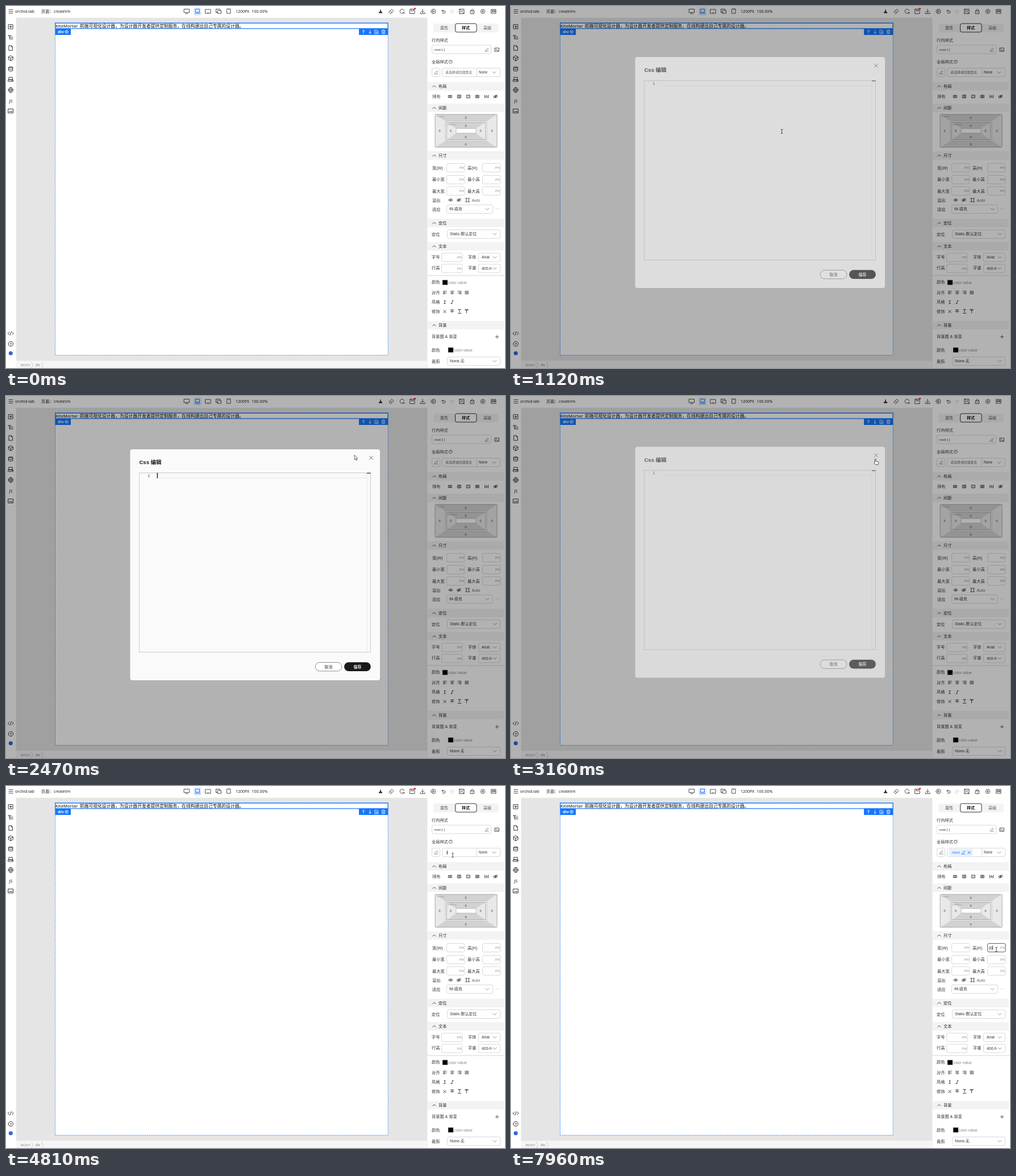
An HTML page that plays this animation: 878x638 px, repeating every 8000 ms.

```html
<!DOCTYPE html>
<html lang="zh-CN">
<head>
<meta charset="utf-8">
<title>Style panel</title>
<style>
html, body { margin: 0; width: 100%; height: 100%; overflow: hidden; background: #fff; }
svg { display: block; }
text { font-family: "Liberation Sans", "Noto Sans CJK SC", "Noto Sans CJK", sans-serif; white-space: pre; }
.ui { font-family: "Noto Sans", "Noto Sans CJK SC", "Noto Sans CJK", sans-serif; }
.mono { font-family: "Liberation Mono", monospace; }
</style>
</head>
<body>
<svg id="stage" width="878" height="638" viewBox="0 0 878 638"></svg>
<script>
const BLUE = '#1476ff', INK = '#222', EDGE = '#d0d0d0', MUTED = '#888';

const text = (x, y, s, size = 7.2, fill = '#333', more = '') =>
  `<text x="${x}" y="${y}" font-size="${size}" fill="${fill}" ${more}>${s}</text>`;
const rect = (x, y, w, h, fill = 'none', stroke = 'none', r = 0, more = '') =>
  `<rect x="${x}" y="${y}" width="${w}" height="${h}" rx="${r}" fill="${fill}" stroke="${stroke}" ${more}/>`;
const path = (d, stroke = INK, w = 0.8, fill = 'none', more = '') =>
  `<path d="${d}" stroke="${stroke}" stroke-width="${w}" fill="${fill}" ${more}/>`;
const icon = (x, y, d, stroke, w, fill) =>
  path(d, stroke, w, fill, `transform="translate(${x} ${y})" stroke-linecap="round" stroke-linejoin="round"`);
const group = (id, body, more = '') => `<g id="${id}" ${more}>${body}</g>`;
const ring = r => `M${-r} 0a${r} ${r} 0 1 0 ${2 * r} 0a${r} ${r} 0 1 0 ${-2 * r} 0`;
const box = (w, h) => `M${-w / 2} ${-h / 2}h${w}v${h}h${-w}z`;
const chevron = (x, y) => icon(x, y, 'M-3-1.5L0 1.5L3-1.5', '#666', 0.7);
const field = (x, y, w, edge = EDGE, fill = '#fff') =>
  rect(x + .5, y + .5, w - 1, 15, fill, edge, 2.5, 'stroke-width=".8"');
const PENCIL = 'M-2.8 2.8l.6-2.2L1.4-3L3-1.4L-.6 2.2zM0 3h3';
const CROSS = 'M-3-3L3 3M3-3L-3 3';
const EYE = 'M-3.5 0Q0-4.4 3.5 0Q0 4.4-3.5 0zM-1 0a1 1 0 1 0 2 0a1 1 0 1 0-2 0';

function topBar() {
  const items = [
    [318, 9, 'M-4.5-3.5h9v6h-9zM-2 4.5h4'],
    [355.5, 9.5, box(9, 7) + 'M-.5 2h1'],
    [374, 9, 'M-4.5-3.5h7v2M-4.5-3.5v6h3M-1.5-1h6v5h-6z'],
    [392, 9, box(6, 8) + 'M-.5-2.3h1'],
    [678, 9.5, 'M-4 1L1-4L4-1L-1 4zM-2-1L1 2'],
    [697, 9.5, 'M3 2.2A3.8 3.8 0 1 1 3.7-1M1.7 2h2.2v2'],
    [715, 9.5, 'M-4-4h7l1 1v7h-8zM-2-4v3h4v-3'],
    [733, 9.5, 'M0-4v6M-2.5-.5L0 2L2.5-.5M-4 2v2h8v-2'],
    [752, 9.5, ring(4) + 'M-1-1.8L2 0L-1 1.8z'],
    [770, 9.5, 'M-1-3L-3-1L-1 1M-3-1h4q2 0 2 2t-2 2h-3'],
    [802, 9.5, box(8, 8) + 'M-4-4L4 4M1-2h1v1M-2 2v-2'],
    [820.5, 9.5, 'M-3-1h6v5h-6zM-2-1v-1.5q2-3 4 0v1.5M0 1v1'],
    [839, 9.5, 'M-3.8 0L-2-3.4H2L3.8 0L2 3.4H-2z' + ring(1.3)],
    [858, 9.5, box(8, 7)]
  ];
  return rect(0, 0, 878, 20.5, '#fff') +
    icon(8.5, 9.5, 'M-3.5-3h7M-3.5 0h7M-3.5 3h7') +
    text(16, 12, 'orchid-lab', 7.2, INK, 'class="ui"') +
    text(62, 12, '页面：', 7.2, INK) + text(84, 12, 'createVm', 6.6, INK, 'class="ui"') +
    rect(330, 2, 14, 15, '#e5efff', 'none', 2) +
    icon(337, 9, 'M-3.5-3.5h7v5.5h-7zM-4.7 4h9.4', BLUE, 1) +
    items.map(i => icon(...i)).join('') +
    icon(659, 9.5, 'M0-3.3v2M-2.8 2.5Q0-2 2.8 2.5z' + ring(.6), INK, 1.1, INK) +
    icon(784.5, 9.5, 'M1-3L3-1L1 1M3-1h-4q-2 0-2 2t2 2h3', '#ccc') +
    '<circle cx="719.5" cy="4.5" r="1.6" fill="#e8202a"/>' +
    text(858, 11.4, 'EN', 4.8, INK, 'text-anchor="middle" font-weight="bold"') +
    text(404, 12, '1200PX', 7, INK, 'class="ui"') + text(432.5, 12, '100.00%', 7, INK, 'class="ui"');
}

function sideBar() {
  const items = [
    [36.5, box(7.5, 7.5) + 'M0-2v4M-2 0h4'],
    [55, 'M-4-3h5M-2 0h6M-2 3h6M-4-3v1M-2-2v5'],
    [74, 'M-3-4.2h4L3.3-2v6.2h-6.3zM1-4v2h2'],
    [92, 'M0-4.3L4-2V2.3L0 4.5L-4 2.3V-2zM-4-2L0 .2L4-2M0 .2V4.5'],
    [111, 'M-3.5-3q3.5-2 7 0v6q-3.5 2-7 0zM-3.5-3q3.5 2 7 0M-3.5 0q3.5 2 7 0'],
    [129.5, 'M-3-3.8h6v4.3h-6zM-4.2.5h8.4v3h-8.4zM2 2h.5'],
    [148, ring(4.2) + 'M-4 0h8M0-4.2Q-4 0 0 4.2M0-4.2Q4 0 0 4.2'],
    [185, box(8.5, 7)],
    [577, 'M-2.5-2.5L-5 0L-2.5 2.5M2.5-2.5L5 0L2.5 2.5M1-3L-1 3'],
    [595.5, ring(4.2)]
  ];
  return rect(0, 20.5, 17.5, 618, '#fff') +
    items.map(([y, d]) => icon(8.3, y, d, INK, .9)).join('') +
    text(8.5, 169.8, 'JS', 7.4, INK, 'class="ui" text-anchor="middle"') +
    text(8.3, 186.6, 'var', 4.3, INK, 'text-anchor="middle" font-weight="bold"') +
    text(8.3, 597.8, '?', 6.2, INK, 'text-anchor="middle" font-weight="bold"') +
    '<circle cx="8.3" cy="612" r="3.6" fill="#3567d6"/>';
}

function canvasArea() {
  const white = [
    [629, 45.5, 'M0 3V-3M-2-1L0-3L2-1'],
    [640.5, 45.5, 'M0-3V3M-2 1L0 3L2 1'],
    [652, 45.5, 'M-2.7-3h4l1.5 1.5v4.8h-5.5zM-1 0h2M-1 1.5h2'],
    [664, 45.5, 'M-3-2.2h6M-1-3.4h2M-2.3-2v5.2h4.6V-2M-.7 0v1.6M.7 0v1.6'],
    [106.7, 45.5, ring(2.8) + ring(1)]
  ];
  return rect(17.5, 20.5, 723.5, 605, '#e5e5e5') +
    rect(86.5, 29.5, 585.7, 586, '#fff', BLUE, 0, 'stroke-width=".8" stroke-dasharray="1.8 1.5"') +
    rect(86.7, 30.2, 585.3, 9.6, 'none', BLUE, 0, 'stroke-width="1.2"') +
    text(87, 38.2, 'KiteMortar', 7.8, '#111', 'class="ui"') +
    text(129.8, 38.2, '前端可视化设计器，为设计器开发者提供定制服务，在线构建出自己专属的设计器。', 7.8, '#111') +
    rect(86.5, 40, 27.5, 11, BLUE) + rect(621, 40, 51.3, 11, BLUE) +
    text(91, 48, 'div', 7.2, '#fff', 'class="ui" font-weight="600"') +
    white.map(i => icon(...i, '#fff')).join('') +
    rect(17.5, 625.5, 723.5, 13, '#f6f6f6') +
    text(26, 634.8, 'BODY', 6, MUTED) + text(52, 634.8, 'div', 6.4, MUTED) +
    icon(46, 632.5, 'M-1-5L1.5 0L-1 5', '#bbb', .7) + icon(64, 632.5, 'M-1-5L1.5 0L-1 5', '#bbb', .7);
}

function spacing() {
  const quad = (x, y, X, Y, a, b, A, B) =>
    path(`M${x} ${y}H${X}L${A} ${b}H${a}zM${x} ${Y}H${X}L${A} ${B}H${a}z`, 'none', 0, '#d2d2d2') +
    path(`M${x} ${y}L${a} ${b}V${B}L${x} ${Y}zM${X} ${y}L${A} ${b}V${B}L${X} ${Y}z`, 'none', 0, '#e9e9e9');
  const zeros = [[809, 197], [763, 220], [855, 220], [809, 244], [809, 210.5], [782.5, 220], [835, 220], [809, 230.5]];
  return quad(755, 191, 864, 249, 774, 204, 845, 237) +
    rect(755, 191, 109, 58, 'none', '#999', 1, 'stroke-width=".8"') +
    rect(773, 203, 73, 35, '#fff', '#aaa', 0, 'stroke-width=".6"') +
    quad(775, 205, 844, 236, 792, 216, 827, 224) +
    rect(775, 205, 69, 31, 'none', '#888', 0, 'stroke-width=".7"') +
    rect(792, 216, 35, 8, '#fff', '#aaa', 0, 'stroke-width=".7"') +
    text(758, 195.8, 'margin', 4.4, '#999') + text(777, 209.6, 'padding', 4.4, '#999') +
    zeros.map(([x, y]) => text(x, y + 2, '0', 5.4, '#333', 'text-anchor="middle"')).join('');
}

function panel() {
  const heads = [[141.5, '布局'], [179.5, '间距'], [263.5, '尺寸'], [382.5, '定位'], [423.5, '文本'], [562.5, '背景']];
  const labels = [
    [749, 63, '行内样式'], [749, 100.7, '全局样式'], [750, 162, '排布'],
    [750, 287.8, '宽(W)'], [812, 287.8, '高(H)'], [750, 308.4, '最小宽'], [812, 308.4, '最小高'],
    [750, 328.6, '最大宽'], [812, 328.6, '最大高'], [750, 345, '溢出'], [750, 361, '适应'],
    [749, 404.8, '定位'], [749, 444.5, '字号'], [813, 444.5, '字体'], [749, 464, '行高'], [813, 464, '字重'],
    [749, 488.5, '颜色'], [749, 507.8, '对齐'], [749, 524.3, '风格'], [749, 541, '修饰'],
    [749, 585.3, '背景图 &amp; 渐变'], [749, 609, '颜色'], [749, 629, '裁剪']
  ];
  const px = [[775, 277], [838, 277], [775, 298], [838, 298], [775, 318], [838, 318]];
  const selects = [
    [775, 350, 82, 'fill-填充', 780], [776, 394, 94, 'Static-默认定位', 781],
    [831, 435, 39, 'Arial', 837], [831, 454.5, 39, '400-N', 837], [776, 618, 94, 'None-无', 781]
  ];
  const layout = [box(5.5, 4) + 'M-1-.5h2v1h-2z', box(5.5, 5) + 'M-1-2v4M1-2v4', box(5.5, 5) + 'M-1-1h0M1-1h0M-1 1h0M1 1h0',
    box(5.5, 4.6) + 'M-1-1h2v2h-2z', 'M-3-2.5v5M3-2.5v5M-1.3 2L0-2L1.3 2', EYE + 'M-3 3L3-3'];
  const bars = ['M-3-2.4h6M-3-.8h3M-3 .8h6M-3 2.4h3', 'M-3-2.4h6M-1.5-.8h3M-3 .8h6M-1.5 2.4h3',
    'M-3-2.4h6M0-.8h3M-3 .8h6M0 2.4h3', 'M-3-2.4h6M-3-.8h6M-3 .8h6M-3 2.4h6'];
  const TEE = 'M-2.5-2.5h5M0-2.5v5';
  const marks = [
    [772, 522, 'M-1.2-2.5h2.4M0-2.5v5M-1.2 2.5h2.4'], [785, 522, 'M0-2.5h2.2M1-2.5L-1 2.5M-2.2 2.5h2.2'],
    [772, 538.5, 'M-2.3-2.3l4.6 4.6M2.3-2.3l-4.6 4.6'], [785, 538, TEE + 'M-3 .2h6'],
    [798, 537.5, TEE + 'M-2.8 4h5.6'], [810.5, 538.5, TEE + 'M-2.8-3.6h5.6']
  ];
  const out = [
    rect(741, 20.5, 137, 618, '#fff'),
    path('M741.2 21V638', '#e6e6e6', .6),
    rect(752, 31, 114.5, 15.5, '#f3f3f3', 'none', 3),
    rect(790.5, 31, 37.5, 15, '#fff', '#191919', 3, 'stroke-width=".9"'),
    text(764, 41.3, '属性', 7, '#555'), text(802, 41.3, '样式', 7, '#111', 'font-weight="bold"'), text(840, 41.3, '高级', 7, '#555'),
    ...heads.map(([y, s]) => rect(741, y - 7.5, 135, 15, '#f3f3f3') +
      icon(753.5, y, 'M-2.8 1.4L0-1.4L2.8 1.4', '#333', .9) + text(761, y + 2.7, s, 7.2, INK, 'font-weight="500"')),
    ...labels.map(([x, y, s]) => text(x, y, s)),
    field(749, 68.5, 105), text(752.5, 79.2, ':root { }', 6.2), icon(846, 77, PENCIL, '#555', .6),
    icon(863.8, 77, box(7, 6) + 'M-2-1.3L-.6 0L-2 1.3M.5 1.3h1.6', INK, .8),
    icon(782.3, 98.2, ring(3), '#444', .7), text(782.3, 100.3, '?', 5, '#444', 'text-anchor="middle"'),
    field(749, 109, 15), icon(757, 117, PENCIL, '#555', .6),
    field(767, 109, 103), path('M828.5 109.5V124.5', EDGE, .8),
    text(832, 119.4, 'None', 6.3), chevron(859, 117.3),
    ...layout.map((d, i) => icon(781.5 + 16 * i, 159.5, d, '#333', .9)),
    spacing(),
    ...px.map(([x, y]) => field(x, y, 32.5) + text(x + 23, y + 10.4, 'PX', 6, MUTED)),
    icon(782.5, 342, EYE), icon(797, 342, EYE + 'M-3 3L3-3'),
    icon(812, 342, 'M-3.5-3h3M-3.5 3h3M-2-3v6M1-3h2.5M1 3h2.5M2.2-3v6'), text(819.5, 344.8, 'Auto', 7.2, '#666'),
    text(861, 360, '···', 7, '#777'),
    ...[435, 454.5].map(y => field(766, y, 37.5) + text(794, y + 10.4, 'PX', 6, MUTED)),
    ...selects.map(([x, y, w, s, tx]) => field(x, y, w) + text(tx, y + 10.3, s, 6.9) +
      (s === '400-N' ? rect(854.5, y + 2, 10, 11, '#fff') : '') + chevron(x + w - 10, y + 8)),
    path('M741 475H877', '#d4d4d4', 1),
    ...[[768, 487], [778, 606]].map(([x, y]) => rect(x, y - 4, 9, 8.5, '#000', '#999', 0, 'stroke-width=".6"') +
      text(x + 10, y + 2.6, 'color value', 6.8, MUTED)),
    ...bars.map((d, i) => icon(772.3 + 12.8 * i, 505, d, '#333', .8)),
    ...marks.map(m => icon(...m, '#333', .9)),
    icon(864, 583, 'M-2.8 0h5.6M0-2.8v5.6', '#333', .8)
  ];
  return out.join('');
}

function live() {
  return group('hint', text(773, 119.4, '请选择或创建类名', 5.9, '#666')) +
    group('typed', text(775, 119.3, '', 6, '#333')) +
    group('tag', rect(771.5, 111, 41, 12, '#e4efff', 'none', 2) + text(775, 119.4, '.test1', 6.1, BLUE) +
      icon(796, 117.3, PENCIL, BLUE, .7) + icon(806, 117.3, 'M-2.2-2.2l4.4 4.4M2.2-2.2l-4.4 4.4', BLUE, .9)) +
    group('focus', field(838, 277, 32.5, '#444', 'none')) +
    group('height', text(840.5, 287.6, '', 6.4, '#222')) +
    group('bar', rect(-.35, 0, .7, 7.5, '#111'));
}

function dialog() {
  return rect(218.5, 94, 439.5, 407, '#fafafa', 'none', 4) +
    text(234.5, 120.2, 'Css 编辑', 9.5, '#191919', 'font-weight="bold"') +
    icon(642.5, 109, CROSS, '#444', .8) +
    rect(234.5, 135.5, 407, 316, '#fafafa', '#c6c6c6', 0, 'stroke-width=".9"') +
    path('M266 144.5H635M635 136V451', '#e2e2e2', .8) + path('M635 136H641.5', '#333', 1.3) +
    text(249.5, 142.6, '1', 6.6, '#2a3a90', 'class="mono"') +
    group('edit', rect(265.7, 135.5, 1.3, 9.5, '#111')) +
    rect(544.3, 469.5, 46.5, 15.3, '#fff', '#777', 7.6, 'stroke-width=".8"') + rect(595, 469.2, 46.8, 15.8, '#191919', 'none', 7.9) +
    text(567.5, 479.8, '取消', 6.9, '#333', 'text-anchor="middle"') +
    text(618.4, 479.8, '保存', 6.9, '#fff', 'text-anchor="middle" font-weight="bold"');
}

const pointers =
  group('arrow', path('M0 0V8.2L1.9 6.5L3.2 9.4L4.5 8.8L3.2 6H5.8z', '#222', .7, '#fff')) +
  group('hand', path('M-.8 .6Q.2-.5 1 .6V4L5.2 5Q6 5.4 5.7 6.6L4.8 10H.6L-2 6.6Q-2 5.4-.8 6z', '#222', .8, '#fff')) +
  group('beam', path('M-1.8-3.6H-.5L0-3.2L.5-3.6H1.8M0-3.2V3.2M-1.8 3.6H-.5L0 3.2L.5 3.6H1.8', '#222', .8));

document.getElementById('stage').innerHTML = canvasArea() + topBar() + sideBar() + panel() + live() +
  group('dim', rect(0, 0, 878, 638, '#000')) + group('dialog', dialog()) + group('pointer', pointers);

const $ = id => document.getElementById(id);
const show = (id, on) => $(id).style.display = on ? '' : 'none';

// time, x, y, pointer kind from that time on
const track = [
  [100, 872, 24, 'arrow'], [250, 872, 24, 'arrow'], [420, 815, 80, 'arrow'], [590, 757, 117, 'hand'],
  [650, 755, 118, 'arrow'], [730, 711, 150, 'arrow'], [970, 711, 150, 'beam'], [1120, 477, 221, 'beam'],
  [1300, 395, 214, 'beam'], [1750, 246, 170, 'beam'], [1900, 290, 162, 'beam'], [2200, 440, 134, 'arrow'],
  [2470, 612.7, 104, 'arrow'], [2560, 646, 104, 'arrow'], [2680, 646, 104, 'hand'], [2830, 641, 111, 'hand'],
  [3170, 641, 111, 'hand'], [3250, 678.5, 123.5, 'hand'], [3480, 780, 121, 'beam'], [3550, 786, 122, 'beam'],
  [6520, 786, 122, 'arrow'], [6550, 785, 128, 'arrow'], [6820, 822, 215, 'arrow'], [6930, 848, 280, 'beam'],
  [7120, 854, 288, 'beam'], [8000, 854, 288, 'beam']
];
const keys = [[0, ''], [4750, 't'], [4840, 'te'], [4930, 'test'], [5020, 'test1'], [5860, '']];
const digits = [[0, ''], [7900, '2'], [7960, '20']];
const within = (t, ...spans) => spans.some(([a, b]) => t >= a && t < b);
const at = (steps, t) => steps.filter(s => s[0] <= t).pop()[1];
const ramp = (t, a, b) => Math.min(1, Math.max(0, (t - a) / (b - a)));

function movePointer(t) {
  show('pointer', t >= 100);
  if (t < 100) return;
  const i = track.findIndex(k => k[0] > t);
  const [a, x, y, kind] = track[i - 1], [b, X, Y] = track[i];
  const k = (t - a) / (b - a);
  $('pointer').setAttribute('transform', `translate(${x + (X - x) * k} ${y + (Y - y) * k})`);
  for (const id of ['arrow', 'hand', 'beam']) show(id, id === kind);
}

function draw(t) {
  const fade = t < 3000 ? ramp(t, 970, 1220) : 1 - ramp(t, 3110, 3225);
  $('dialog').style.opacity = fade;
  $('dialog').setAttribute('transform', `translate(0 ${-10 * (1 - fade)})`);
  $('dim').style.opacity = .3 * (t < 3000 ? ramp(t, 970, 1090) : 1 - ramp(t, 3190, 3240));
  show('edit', within(t, [1220, 1700], [2200, 2700]));

  const word = at(keys, t), num = at(digits, t);
  show('hint', t < 3490);
  show('tag', t >= 5860);
  show('focus', t >= 6940);
  $('typed').firstChild.textContent = word;
  $('height').firstChild.textContent = num;

  const early = within(t, [3490, 3820], [4150, 4480], [4750, 5200], [5530, 5860]);
  const late = within(t, [6940, 7270], [7570, 8000]);
  show('bar', early || late);
  const bx = early ? 774.8 + [0, 1.7, 5, 0, 10, 13.2][word.length] : 840.5 + 3.6 * num.length;
  $('bar').setAttribute('transform', `translate(${bx} ${early ? 113.5 : 281.3})`);
  movePointer(t);
}

const start = performance.now();
function tick() {
  draw((performance.now() - start) % 8000);
  requestAnimationFrame(tick);
}
tick();
</script>
</body>
</html>
```
